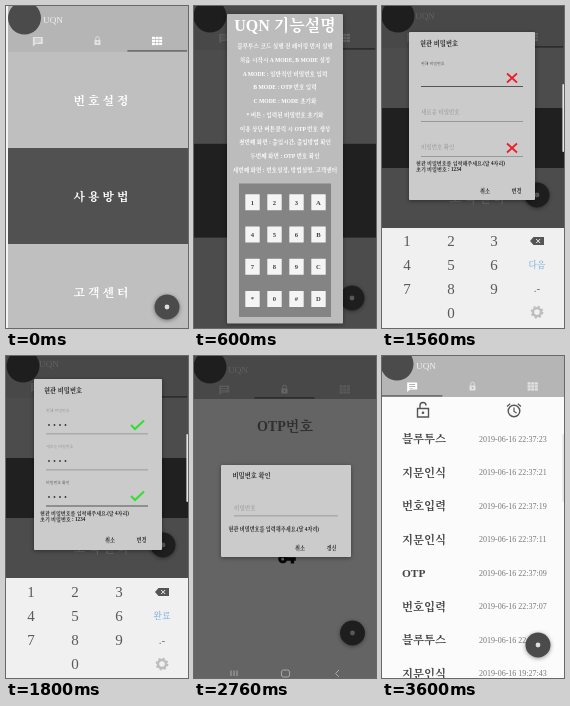
These frames come from a looping animation (182 px wide and 322 px high, 4200 ms). An HTML page:

```html
<!DOCTYPE html>
<html lang="ko">
<head>
<meta charset="utf-8">
<title>Door lock app</title>
<style>
html, body { margin: 0; width: 100%; height: 100%; overflow: hidden; background: #fff; }
svg { display: block; width: 182px; height: 322px; }
text { font-family: 'Liberation Serif', 'Noto Serif CJK KR', 'Noto Sans CJK KR', 'Noto Sans CJK', serif; white-space: pre; }
.card { filter: drop-shadow(0 1px 2px #0006); }
.screen { visibility: hidden; animation: show 4200ms step-end infinite; animation-delay: calc(var(--i) * 600ms - 4200ms); }
@keyframes show {
  0% { visibility: visible; }
  14.2857%, 100% { visibility: hidden; }
}
</style>
</head>
<body>
<svg id="stage" viewBox="0 0 182 322"></svg>
<script>
const APP = 'UQN';
const PAGE = '#fbfbfb', DARK = '#4b4b4b', PANEL = '#bfbfbf', DIALOG = '#cbcbcb', INK = '#222', FAINT = '#8e8e8e';

const rect = (x, y, w, h, fill, r = 0) =>
  `<rect x="${x}" y="${y}" width="${w}" height="${h}" rx="${r}" fill="${fill}"/>`;
const dot = (x, y, r, fill) => `<circle cx="${x}" cy="${y}" r="${r}" fill="${fill}"/>`;
const line = (d, color, w = 1) =>
  `<path d="${d}" fill="none" stroke="${color}" stroke-width="${w}"/>`;
const shape = (d, fill) => `<path d="${d}" fill="${fill}" fill-rule="evenodd"/>`;
const card = (x, y, w, h, fill = DIALOG) => `<g class="card">${rect(x, y, w, h, fill, 1)}</g>`;

// y is the vertical middle of the text
const text = (x, y, str, size, fill, weight = 400, anchor = 'start') =>
  `<text x="${x}" y="${y + size * 0.36}" font-size="${size}" fill="${fill}" font-weight="${weight}" text-anchor="${anchor}">${str}</text>`;
const mid = (x, y, str, size, fill, weight) => text(x, y, str, size, fill, weight, 'middle');

const icons = {
  chat: c => shape('M-5-4H5V3H-2L-5 5.5ZM-3-2.4V-1.6H3V-2.4ZM-3-.4V.4H3V-.4ZM-3 1.4V2H1V1.4Z', c),
  lock: c => rect(-3, -1, 6, 5, c, 0.6) + line('M-1.8-1V-2.5a1.8 1.8 0 0 1 3.6 0V-1', c, 0.9) + dot(0, 1.4, 0.8, '#aaa'),
  grid: c => [0, 1, 2].map(r => [0, 1, 2].map(k => rect(k * 3.6 - 5.2, r * 3 - 4.2, 3, 2.3, c)).join('')).join(''),
  key: c => shape('M-8 0a4.2 4.2 0 0 1 8-1.5H8V1.5H6.5V4.2H3.4V1.5H0A4.2 4.2 0 0 1-8 0ZM-5.3 0a1.4 1.4 0 1 0 2.8 0a1.4 1.4 0 1 0-2.8 0Z', c),
  cross: c => line('M-5-4.5L5 4.5M5-4.5L-5 4.5', c, 1.8),
  check: c => line('M-6 0L-2 4L7-4.5', c, 2),
  unlock: c => line('M-5.5-1.5H5.5V7H-5.5ZM-3-1.5V-4.5a3 3 0 0 1 6 0', c, 1.4) + dot(0, 2.8, 1.3, c),
  alarm: c => `<circle r="5.8" fill="none" stroke="${c}" stroke-width="1.4"/>` +
    line('M0-3.5V.5L2.6 2M-7-4.5L-3.8-7.2M7-4.5L3.8-7.2', c, 1.2),
  erase: c => shape('M-7 0L-3.5-4H7V4H-3.5Z', c) + line('M-.8-2L3.2 2M3.2-2L-.8 2', '#f0f0f0', 1),
  gear: c => `<circle r="4" fill="none" stroke="${c}" stroke-width="2.4"/>` +
    `<circle r="5.6" fill="none" stroke="${c}" stroke-width="1.6" stroke-dasharray="2.2 2.2"/>`
};
const icon = (name, x, y, color, s = 1) =>
  `<g transform="translate(${x} ${y}) scale(${s})">${icons[name](color)}</g>`;

const fab = (x, y) => `<g class="card">${dot(x, y, 12.5, DARK)}</g>` + dot(x, y, 2.4, '#ddd');
const dim = (h = 322) => rect(0, 0, 182, h, '#0009');
const edge = () => rect(180.4, 78, 1.6, 68, '#e6e6e6', 0.8);

function header(x, h, iconY, tab, logoX, logoY, nameX, nameY) {
  const w = (181 - x) / 3;
  const tabs = ['chat', 'lock', 'grid'].map((n, i) =>
    icon(n, x + w * (i + 0.5), iconY, i === tab ? '#fff' : '#e2e2e2')).join('');
  return rect(x, 0, 182 - x, h, '#b5b5b5') + tabs + rect(x + w * tab, h - 2, w, 1.7, '#707070') +
    dot(logoX, logoY, 16.5, DARK) + text(nameX, nameY, APP, 9.2, '#eee');
}

function menu(x, top, step) {
  return rect(x, top, 182 - x, 322, PANEL) + rect(x, top + step, 182 - x, step, '#515151') +
    ['번 호 설 정', '사 용 방 법', '고 객 센 터'].map((s, i) =>
      mid(95, top + step * (i + 0.5) + 1, s, 11.9, '#fff', 600)).join('');
}

function keypad() {
  const keys = [...'123A456B789C*0#D'].map((k, i) => {
    const x = 58.5 + (i % 4) * 22, y = 196.3 + (i >> 2) * 32.2;
    return rect(x - 7.2, y - 8, 14.4, 16, '#f4f4f4', 0.5) + mid(x, y, k, 6.6, '#444', 700);
  });
  return rect(45, 177.5, 92, 133.5, '#848484') + keys.join('');
}

function keyboard(x3, y0, step, action) {
  const digits = [...'123456789'].map((n, i) =>
    mid([25, 69, x3][i % 3], y0 + Math.floor(i / 3) * step, n, 15, '#5a5a5a'));
  const right = x3 + 43;
  return rect(0, 222, 182, 100, '#f0f0f0') + digits.join('') + mid(69, y0 + step * 3, '0', 15, '#5a5a5a') +
    icon('erase', right, y0, '#555') + mid(right, y0 + step, action, 8.8, '#69a7dc', 500) +
    mid(right, y0 + step * 2, '.-', 11, '#666') + icon('gear', right, y0 + step * 3, '#bdbdbd');
}

const ASK = '현관 비밀번호를 입력해주세요.(달 4자리)';
const LABELS = ['현재 비밀번호', '새로운 비밀번호', '비밀번호 확인'];
const rule = (x, y, w, color, h = 0.8) => rect(x, y, w, h, color);
const buttons = (x, y, ok) => mid(x, y, '취소', 5.2, INK, 700) + mid(x + 31.5, y, ok, 5.2, INK, 700);
const hints = () => text(34, 157, ASK, 5.05, INK, 700) + text(34, 163.5, '초기 비밀번호 : 1234', 5.1, INK, 700);

function formBack(logoX, nameY, fabX) {
  return menu(0, 42, 60) + header(0, 42, 31, 2, logoX, 10, 33, nameY) + fab(fabX, 189) + dim(222) + edge();
}

function home() {
  return rect(0, 0, 182, 322, '#f4f4f4') + menu(2, 46, 96) +
    header(2, 46, 35, 2, 18.5, 12, 37, 13.5) + fab(161, 301);
}

function guide() {
  const lines = [
    '블루투스 코드 실행 전 페이링 먼저 실행', '처음 시작시 A MODE, B MODE 설정',
    'A MODE : 일반적인 비밀번호 입력', 'B MODE : OTP 번호 입력', 'C MODE : MODE 초기화',
    '* 버튼 : 입력된 비밀번호 초기화', '이용 상단 버튼클릭 시 OTP 번호 생성',
    '첫번째 화면 : 출입시간, 출입방법 확인', '두번째 화면 : OTP 번호 확인',
    '세번째 화면 : 번호설정, 방법설명, 고객센터'
  ];
  return menu(0, 44, 93.8) + header(0, 44, 32, 2, 16, 10, 33, 11) + fab(158, 292) + dim() +
    card(33, 8, 116, 309.5, '#bcbcbc') + mid(91, 19, APP + ' 기능설명', 16, '#fff', 700) +
    lines.map((s, i) => mid(91, 40 + i * 13.75, s, 5.65, '#fff', 600)).join('') + keypad();
}

function formEmpty() {
  return formBack(16, 10, 155) + card(27, 26, 126, 168) +
    text(38, 37.5, '현관 비밀번호', 6.3, INK, 700) +
    text(39, 58, LABELS[0], 3.9, '#444', 500) + rule(39, 80, 102, '#555', 1) +
    text(39, 106, LABELS[1], 5.5, FAINT, 500) + rule(39, 115, 102, FAINT) +
    text(39, 141, LABELS[2], 5.5, FAINT, 500) + rule(39, 150, 102, FAINT) +
    icon('cross', 130, 72, '#e8202c') + icon('cross', 130, 142, '#e8202c') +
    hints() + buttons(103, 185, '변경') + keyboard(112, 235, 23.7, '다음');
}

function formFilled() {
  const fields = LABELS.map((s, i) => {
    const y = 55 + i * 36, last = i === 2;
    return text(40, y, s, 3.9, last ? '#444' : FAINT, 500) +
      [0, 1, 2, 3].map(k => dot(43 + k * 5.5, y + 14, 0.9, '#333')).join('') +
      rule(40, y + 22.5, 102, last ? '#555' : FAINT, last ? 1 : 0.8);
  });
  return formBack(17, 8, 157) + card(28, 23, 128, 171) +
    text(38, 34.5, '현관 비밀번호', 6.3, INK, 700) + fields.join('') +
    icon('check', 131, 69, '#2fe02f') + icon('check', 131, 140, '#2fe02f') +
    hints() + buttons(104, 184, '변경') + keyboard(113, 236, 24, '완료');
}

function confirmCode() {
  return rect(0, 0, 182, 322, PAGE) + header(0, 43, 33.5, 1, 16, 11, 34, 14) +
    mid(91, 70, 'OTP번호', 14.1, '#777', 600) + icon('key', 93, 203, '#111', 1.1) + fab(158.5, 277) + dim() +
    line('M37 314.5V320M40 314.5V320M43 314.5V320', '#aaa') +
    line('M89.5 314H93.5a2 2 0 0 1 2 2V319a2 2 0 0 1-2 2H89.5a2 2 0 0 1-2-2V316a2 2 0 0 1 2-2Z', '#aaa') +
    line('M145 314L141.5 317.5L145 321', '#aaa') +
    card(27, 109, 130, 92) + text(38.5, 119.5, '비밀번호 확인', 6.3, INK, 700) +
    text(40, 151.5, '비밀번호', 5.6, FAINT, 500) + rule(40, 159.5, 104, FAINT) +
    text(34.5, 173, ASK, 5.15, INK, 700) + buttons(106, 192.5, '갱신');
}

function code() {
  const c = '#686868';
  return rect(0, 0, 182, 322, PAGE) + header(0, 42, 31, 1, 15, 8, 33, 10.5) +
    mid(88.5, 70, 'OTP번호', 14.5, c, 500) + mid(90.5, 102, '298198입니다.', 13.1, c, 500) +
    mid(90.5, 128, '제한시간', 11.4, c, 500) + mid(90, 164, '2분0초', 9.6, c, 500) +
    icon('key', 90, 214, '#222', 1.05) + fab(156, 292) + edge();
}

function history() {
  const rows = [
    ['블루투스', '22:37:23'], ['지문인식', '22:37:21'], ['번호입력', '22:37:19'], ['지문인식', '22:37:11'],
    ['OTP', '22:37:09'], ['번호입력', '22:37:07'], ['블루투스', '22:37:06'], ['지문인식', '19:27:43']
  ];
  return rect(0, 0, 182, 322, PAGE) + header(0, 41, 30.5, 0, 15, 8, 34, 10) +
    icon('unlock', 41, 54, '#555') + icon('alarm', 132, 55, '#555') +
    rows.map(([how, time], i) => text(20, 83 + i * 33.5, how, 11.4, '#444', 600) +
      text(97, 83 + i * 33.5, '2019-06-16 ' + time, 8, '#777')).join('') +
    fab(156, 289) + edge();
}

document.getElementById('stage').innerHTML =
  [home, guide, formEmpty, formFilled, confirmCode, code, history]
    .map((draw, i) => `<g class="screen" style="--i:${i}">${draw()}</g>`).join('');
</script>
</body>
</html>
```
